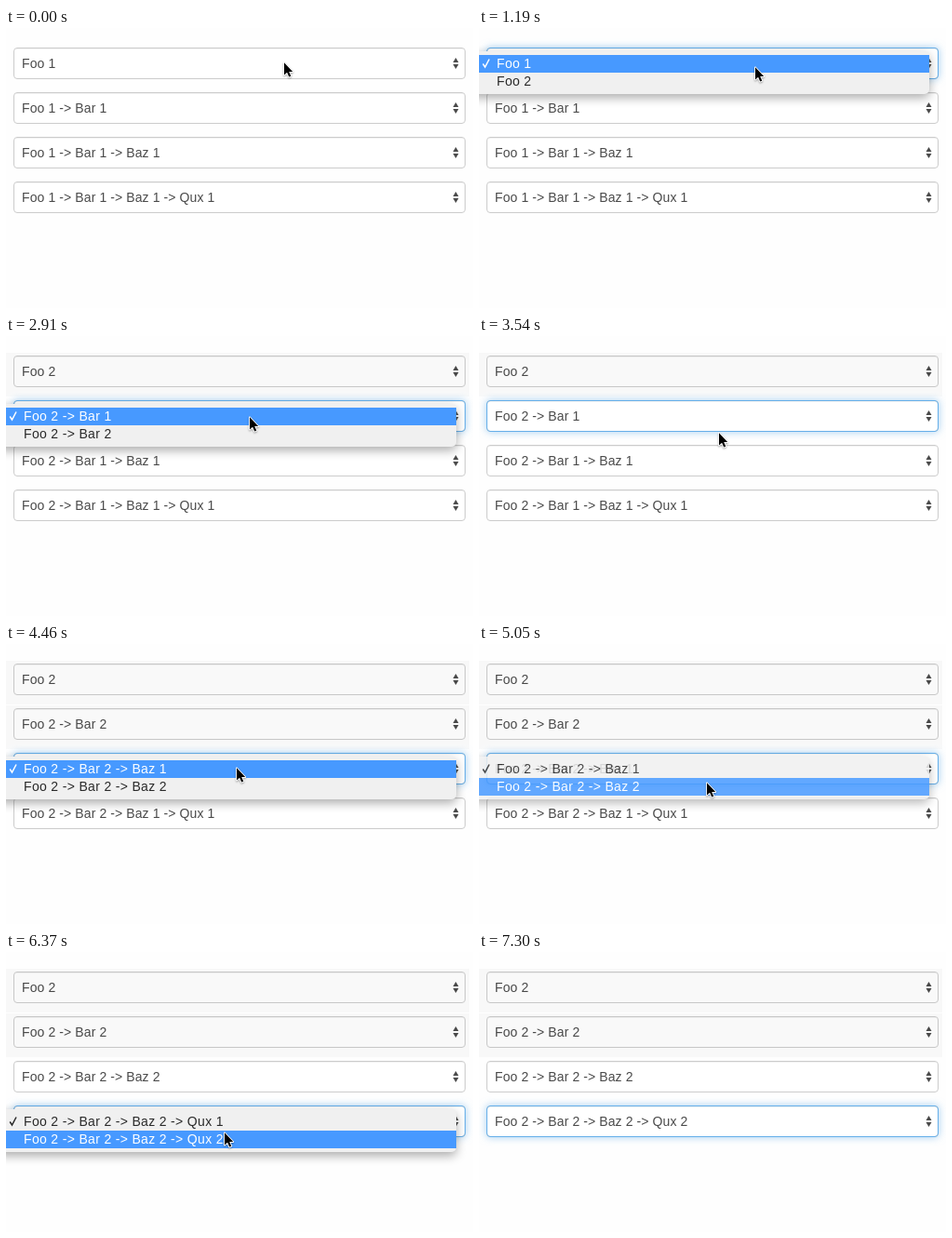
An HTML page with a canvas for the animation above (8240 ms loop, 502 px wide and 301 px high).

```html
<!DOCTYPE html>
<html lang="en">
<head>
<meta charset="utf-8">
<title>Chained selects</title>
<style>
html, body { margin: 0; width: 100%; height: 100%; overflow: hidden; background: #fefefe; }
canvas { display: block; width: 502px; height: 301px; }
</style>
</head>
<body>
<canvas id="stage"></canvas>
<script>
const W = 502, H = 301, LOOP = 8240;
const FONT = '14px "Liberation Sans", Arial, sans-serif';
const ROW_TOP = 21, ROW_STEP = 48, ITEM = 19;
const FADE = 180, APPLY = 150, EXIT = 7130, GONE = 7300;

// Each menu opens, fades out by close, and is crossed by the pointer from x to pickX
const ROWS = [
  { name: 'Foo', open: 815, close: 1880, x: 298, pickX: 290 },
  { name: 'Bar', open: 2560, close: 3500, x: 262, pickX: 257 },
  { name: 'Baz', open: 4160, close: 5180, x: 247, pickX: 244 },
  { name: 'Qux', open: 5800, close: 6860, x: 238, pickX: 234 }
];

const dpr = window.devicePixelRatio || 1;
const canvas = document.getElementById('stage');
const layer = document.createElement('canvas');
for (const c of [canvas, layer]) {
  c.width = W * dpr;
  c.height = H * dpr;
}
const screen2d = canvas.getContext('2d');
const layer2d = layer.getContext('2d');
let ctx = screen2d;

const progress = (t, start, span) => Math.max(0, Math.min(1, (t - start) / span));
const ease = k => k * k * (3 - 2 * k);
const mix = (a, b, k) => a + (b - a) * k;

function pointerAt(t) {
  if (t >= GONE) return null;
  let x = ROWS[0].x, y = 36;
  const move = (toX, toY, k) => {
    x = mix(x, toX, ease(k));
    y = mix(y, toY, ease(k));
  };
  ROWS.forEach((row, i) => {
    move(row.x, 36 + 48 * i, progress(t, row.open - 400, 400));
    move(row.pickX, 58 + 45 * i, progress(t, row.open + 300, 240));
  });
  y += 150 * progress(t, EXIT, GONE - EXIT) ** 2;
  return { x: Math.round(x), y: Math.round(y) };
}

function label(row, t, last) {
  return ROWS.slice(0, row + 1).map(({ name, close }, i) => {
    const digit = last && i === row ? last : t >= close + APPLY ? 2 : 1;
    return name + ' ' + digit;
  }).join(' -> ');
}

function text(str, x, y, color, spacing) {
  ctx.font = FONT;
  ctx.letterSpacing = spacing + 'px';
  ctx.fillStyle = color;
  ctx.fillText(str, x, y);
}

function box(x, y, w, h, r) {
  ctx.beginPath();
  ctx.roundRect(x, y, w, h, r);
}

function poly(points) {
  ctx.beginPath();
  points.forEach(([x, y]) => ctx.lineTo(x, y));
  ctx.closePath();
}

// Paints with a shadow that ends with the callback
function shadowed(color, blur, dy, paint) {
  ctx.save();
  ctx.shadowColor = color;
  ctx.shadowBlur = blur * dpr;
  ctx.shadowOffsetY = dy * dpr;
  paint();
  ctx.restore();
}

function focusOf(row, t) {
  const next = ROWS[row + 1];
  return progress(t, ROWS[row].open, 120) - (next ? progress(t, next.open, 120) : 0);
}

function drawSelect(row, t) {
  const y = ROW_TOP + row * ROW_STEP, focus = focusOf(row, t);
  box(8, y, 486, 34, 4);
  ctx.fillStyle = '#fff';
  shadowed(`rgba(102,175,233,${0.6 * focus})`, 8, 0, () => ctx.fill());

  ctx.fillStyle = 'rgba(0,0,0,.05)';
  ctx.fillRect(11, y + 1, 480, 1);
  box(8.5, y + 0.5, 485, 33, 3.5);
  ctx.lineWidth = 1;
  ctx.strokeStyle = '#ccc';
  ctx.stroke();
  ctx.strokeStyle = `rgba(102,175,233,${focus})`;
  ctx.stroke();

  text(label(row, t), 17, y + 22, '#4a4a4a', 0.1);
  ctx.fillStyle = '#4a4a4a';
  for (const dir of [-1, 1]) {
    const base = y + 17 + dir;
    poly([[480.5, base], [483.5, base + dir * 5], [486.5, base]]);
    ctx.fill();
  }

  // The first rows stay tinted once the next menu has opened
  if (row < 2 && t >= ROWS[row + 1].open + 60) {
    ctx.fillStyle = 'rgba(0,0,0,.025)';
    ctx.fillRect(0, y - 3, 498, 47);
  }
}

function paintMenu(row, t, active) {
  const top = ROW_TOP + 4 + row * ROW_STEP;
  box(-12, top, 496, 46, 5);
  ctx.fillStyle = '#f0f0f0';
  shadowed('rgba(0,0,0,.33)', 11, 4, () => ctx.fill());

  for (let i = 0; i < 2; i++) {
    const y = top + 4 + i * ITEM;
    const color = i === active ? '#fff' : '#2a2a2a';
    if (i === active) {
      ctx.fillStyle = '#4799ff';
      ctx.fillRect(0, y, 484, ITEM);
    }
    text(label(row, t, i + 1), 19, y + 14, color, 0.33);
    if (i === 0) {
      ctx.beginPath();
      ctx.moveTo(4.2, y + 9.5);
      ctx.lineTo(6.5, y + 13);
      ctx.lineTo(11, y + 4.5);
      ctx.lineWidth = 1.5;
      ctx.strokeStyle = color;
      ctx.stroke();
    }
  }
}

// The menu is painted on its own layer so that it fades as one piece
function drawMenu(row, t, pointer) {
  const { open, close } = ROWS[row];
  if (t < open || t >= close) return;
  const blink = t >= close - 300 && t < close - 240;
  const below = pointer.y >= ROW_TOP + row * ROW_STEP + 8 + ITEM;

  ctx = layer2d;
  clear();
  paintMenu(row, t, blink ? -1 : Number(below));
  ctx = screen2d;

  ctx.save();
  ctx.globalAlpha = 1 - progress(t, close - FADE, FADE) ** 1.5;
  ctx.drawImage(layer, 0, 0, W, H);
  ctx.restore();
}

function drawPointer({ x, y }) {
  ctx.save();
  ctx.translate(x + 1, y + 1.3);
  poly([[0, 0], [0, 13.2], [3.1, 10.5], [5.2, 15.3], [7.3, 14.4], [5.2, 9.7], [9.2, 9.7]]);
  ctx.lineJoin = 'round';
  ctx.lineWidth = 1.8;
  ctx.strokeStyle = '#fff';
  shadowed('rgba(0,0,0,.35)', 2, 1, () => ctx.stroke());
  ctx.fillStyle = '#000';
  ctx.fill();
  ctx.restore();
}

function clear() {
  ctx.setTransform(dpr, 0, 0, dpr, 0, 0);
  ctx.clearRect(0, 0, W, H);
}

function draw(t) {
  const pointer = pointerAt(t);
  clear();
  ROWS.forEach((_, row) => drawSelect(row, t));
  ROWS.forEach((_, row) => drawMenu(row, t, pointer));
  if (pointer) drawPointer(pointer);
}

const began = performance.now();
function tick() {
  draw((performance.now() - began) % LOOP);
  requestAnimationFrame(tick);
}
tick();
</script>
</body>
</html>
```
